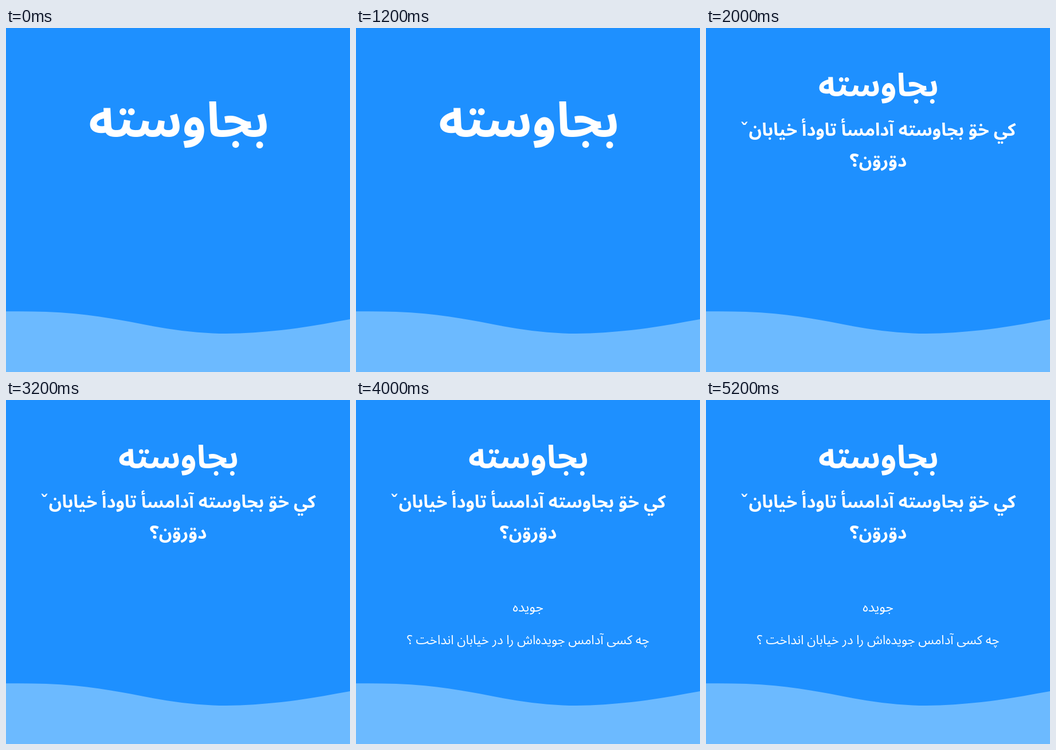
An HTML page for the animation above (6000 ms loop, 600 px wide and 600 px high).

```html
<!DOCTYPE html>
<html lang="glk">
<head>
<meta charset="utf-8">
<title>بجاوسته</title>
<style>
html, body { margin: 0; width: 100%; height: 100%; overflow: hidden; background: #1e90ff; }
svg { display: block; width: 100%; height: 100%; }
text { fill: #fff; text-anchor: middle; direction: rtl; }
</style>
</head>
<body>
<svg id="stage" viewBox="0 0 600 600">
  <rect width="600" height="600" fill="#1e90ff"/>
  <path fill="#6cbaff" d="M0 494.3C40 494 80 494.3 120 498.3S200 509 240 517S320 530.5 360 532.4S440 531 480 527S560 515 600 508V600H0Z"/>
</svg>
<script>
const LOOP = 6000, STEP = 2000;
const FONT = 'Vazirmatn, "Noto Sans Arabic", "DejaVu Sans", sans-serif';
const stage = document.getElementById('stage');
const pen = document.createElement('canvas').getContext('2d');
stage.style.fontFamily = FONT;
pen.direction = 'rtl';
pen.textAlign = 'center';

// Visible from step `from` up to, not including, step `to`.
const lines = [
  { text: 'بجاوسته', weight: 700, left: 146, right: 455, y: 190, from: 0, to: 1 },
  { text: 'بجاوسته', weight: 700, left: 197, right: 403, y: 118.5, from: 1, to: 3 },
  { text: 'کي خۊ بجاوسته آدامسأ تاودأ خيابانˇ', weight: 700, left: 61, right: 541, y: 187.5, from: 1, to: 3 },
  { text: 'دۊرۊن؟', weight: 700, left: 251, right: 349, y: 241.5, from: 1, to: 3 },
  { text: 'جویده', weight: 400, left: 274, right: 326, y: 369, from: 2, to: 3 },
  { text: 'چه کسی آدامس جویده\u200cاش را در خیابان انداخت ؟', weight: 400, left: 89, right: 511, y: 425.5, from: 2, to: 3 }
];

// Pick the font size and centre from the ink of the line.
function addLine(line) {
  pen.font = `${line.weight} 100px ${FONT}`;
  const m = pen.measureText(line.text);
  const inkLeft = m.actualBoundingBoxLeft, inkRight = m.actualBoundingBoxRight;
  const scale = (line.right - line.left) / (inkLeft + inkRight);
  const node = document.createElementNS('http://www.w3.org/2000/svg', 'text');
  node.textContent = line.text;
  node.setAttribute('x', (line.left + line.right) / 2 - (inkRight - inkLeft) / 2 * scale);
  node.setAttribute('y', line.y);
  node.setAttribute('font-size', 100 * scale);
  node.setAttribute('font-weight', line.weight);
  stage.append(node);
  line.node = node;
}

function draw(ms) {
  const step = Math.floor(ms % LOOP / STEP);
  for (const { node, from, to } of lines) {
    node.setAttribute('visibility', step >= from && step < to ? 'visible' : 'hidden');
  }
}

lines.forEach(addLine);
draw(0);
const start = performance.now();
function tick() {
  draw(performance.now() - start);
  requestAnimationFrame(tick);
}
requestAnimationFrame(tick);
</script>
</body>
</html>
```
